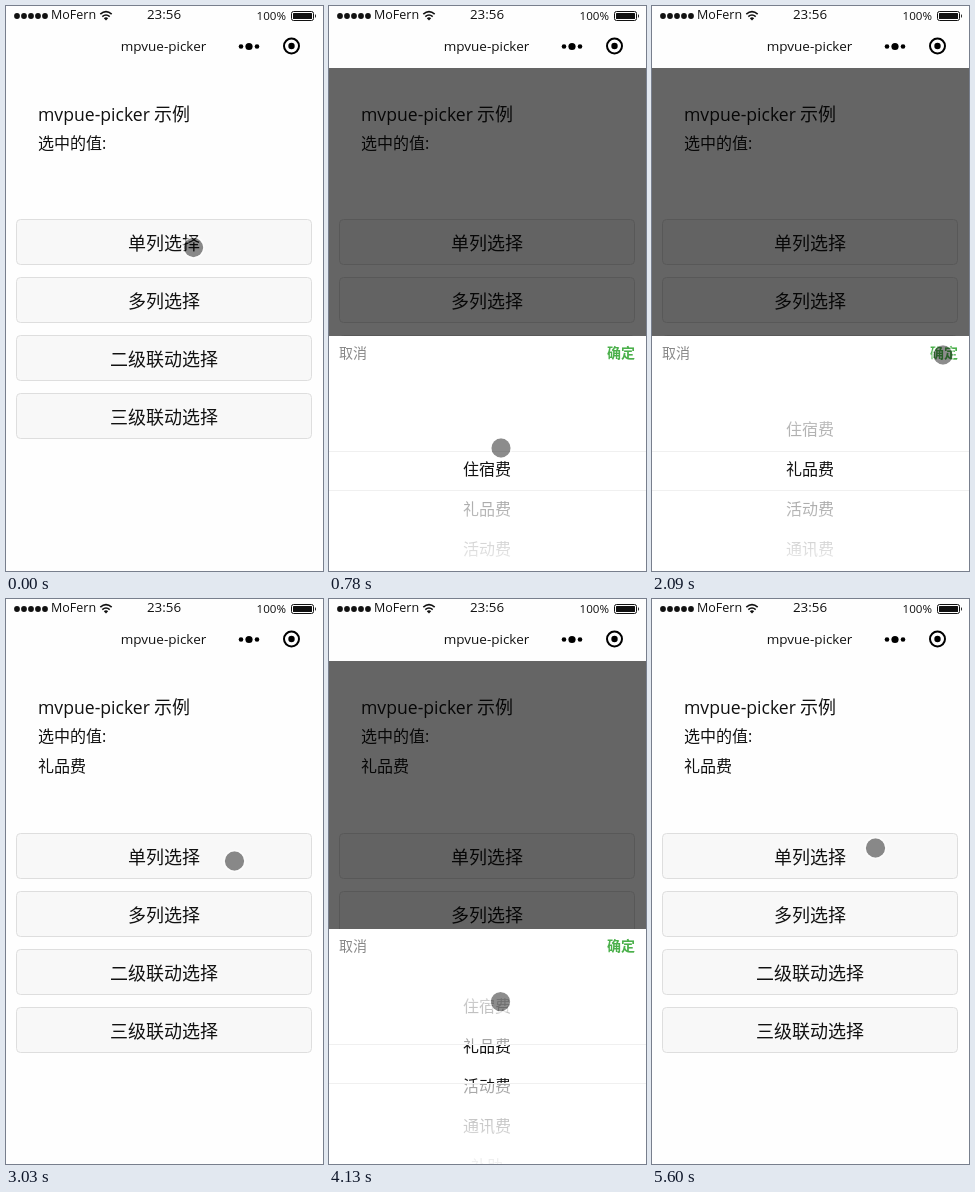
An HTML page that plays this animation: 317x565 px, repeating every 5.68 s.

```html
<!DOCTYPE html>
<html lang="zh-CN">
<head>
<meta charset="utf-8">
<title>mpvue-picker</title>
<style>
html, body { margin: 0; height: 100%; overflow: hidden; background: #fefefe; }
svg { display: block; width: 317px; height: 565px; }
text { font-family: "Open Sans", "Noto Sans CJK SC", "Noto Sans CJK", sans-serif; fill: #111; }
.mid { text-anchor: middle; }
</style>
</head>
<body>
<svg viewBox="0 0 317 565">
  <defs>
    <linearGradient id="fade" x2="0" y2="1">
      <stop stop-color="#fff" stop-opacity=".95"/>
      <stop offset="1" stop-color="#fff" stop-opacity=".6"/>
    </linearGradient>
    <clipPath id="wheel"><path d="M0 365h317v200H0z"/></clipPath>
  </defs>
  <rect width="317" height="565" fill="#fefefe"/>

  <!-- page -->
  <text x="32" y="114.5" font-size="17.6">mvpue-picker</text>
  <text x="148" y="114.5" font-size="18">示例</text>
  <text x="32" y="143" font-size="16">选中的值:</text>
  <text x="32" y="172.5" font-size="16" id="value">礼品费</text>
  <g id="buttons"></g>
  <rect id="shade" y="62" width="317" height="503"/>

  <!-- picker -->
  <g id="panel">
    <rect y="330" width="317" height="235" fill="#fff"/>
    <text x="10" y="352.2" font-size="14" style="fill:#888">取消</text>
    <text x="278" y="352.2" font-size="14" font-weight="700" style="fill:#4bb04b">确定</text>
    <g clip-path="url(#wheel)"><g id="items"></g></g>
    <rect y="365" width="317" height="80" fill="url(#fade)"/>
    <rect y="-565" width="317" height="80" fill="url(#fade)" transform="scale(1 -1)"/>
    <path d="M0 445.5h317M0 484.5h317" stroke="#f0f0f0"/>
  </g>

  <!-- status and title bar -->
  <g id="signal"></g>
  <text x="45" y="13" font-size="12.5">MoFern</text>
  <path d="M94.3 8.2q5.7-5 11.4 0M96.3 10.6q3.7-3.2 7.4 0" fill="none" stroke="#111" stroke-width="1.6"/>
  <path d="M97.8 12.2q2.2-1.8 4.4 0L100 14.4z" fill="#111"/>
  <text x="158" y="12.8" font-size="13.4" class="mid">23:56</text>
  <text x="250.5" y="14" font-size="11.6">100%</text>
  <rect x="285.5" y="5.5" width="22" height="9" rx="2" fill="none" stroke="#111"/>
  <rect x="287" y="7" width="19" height="6" rx=".5" fill="#111"/>
  <path d="M309 8q2 2 0 4z" fill="#111"/>
  <text x="157.5" y="45" font-size="13.5" class="mid">mpvue-picker</text>
  <circle cx="235" cy="40.5" r="2.3"/>
  <circle cx="243" cy="40.5" r="3.6"/>
  <circle cx="251" cy="40.5" r="2.3"/>
  <circle cx="285.5" cy="40" r="7.5" fill="none" stroke="#000" stroke-width="2"/>
  <circle cx="285.5" cy="40" r="3.2"/>

  <g id="cursor">
    <circle r="9.7" fill-opacity=".45"/>
    <circle r="10.5" fill="none" stroke="#fff" stroke-opacity=".55" stroke-width="1.7"/>
  </g>
</svg>
<script>
const LOOP = 5680, TICK = 77.8;
const $ = id => document.getElementById(id);
const move = (id, x, y) => $(id).setAttribute('transform', `translate(${x} ${y})`);
const label = (s, y, size) =>
  `<text x="158" y="${y}" font-size="${size}" class="mid">${s}</text>`;
const fill = (id, list, make) => $(id).innerHTML = list.map(make).join('');

fill('buttons', ['单列选择', '多列选择', '二级联动选择', '三级联动选择'], (s, i) =>
  `<rect x="10.5" y="${213.5 + 58 * i}" width="295" height="45" rx="4" fill="#f8f8f8" stroke="#dedede"/>`
  + label(s, 243.5 + 58 * i, 18));
fill('items', ['住宿费', '礼品费', '活动费', '通讯费', '补助'], (s, i) =>
  label(s, 468.5 + 40 * i, 16));
fill('signal', [...'.....'], (s, i) =>
  `<circle cx="${11 + 7 * i}" cy="10" r="2.9" fill="#111"/>`);

const smooth = p => p * p * (3 - 2 * p);
const easeOut = p => p * (2 - p);
const ramp = (t, from, to) => Math.min(1, Math.max(0, (t - from) / (to - from)));

// The panel takes 300 ms to slide in or out; the wheel turns one row per drag.
const slide = (t, from) => easeOut(ramp(t, from, from + 300 / TICK));
const drag = (t, from) => 40 * smooth(ramp(t, from, from + 9.5));

// Pointer moves: start tick, end tick, x, y
const moves = [
  [2, 10, 172, 442], [12, 20, 178, 384], [20, 27, 291, 349],
  [29, 37, 228.5, 246], [37, 39, 228.5, 262],
  [42, 46, 175, 460], [46, 57, 170, 378], [57, 60, 235, 306],
  [60, 62, 232, 207], [62, 64, 223.5, 249]
];

function pointer(t) {
  let x = 187.5, y = 241.5;
  for (const [from, to, toX, toY] of moves) {
    const p = smooth(ramp(t, from, to));
    x += (toX - x) * p;
    y += (toY - y) * p;
  }
  return [x, y];
}

function draw(now) {
  const t = Math.floor(now % LOOP / TICK + 0.3);
  const open = slide(t, 2.5) - slide(t, 29.5) + slide(t, 43) - slide(t, 67.5);
  const chosen = t >= 30;
  $('value').style.display = chosen ? '' : 'none';
  move('buttons', 0, chosen ? 21 : 0);
  $('shade').setAttribute('fill-opacity', 0.6 * easeOut(open));
  move('panel', 0, 235 * (1 - open));
  move('items', 0, -drag(t, 12) - drag(t, 49));
  move('cursor', ...pointer(t));
}

const start = performance.now();
function frame() {
  draw(performance.now() - start);
  requestAnimationFrame(frame);
}
frame();
</script>
</body>
</html>
```
